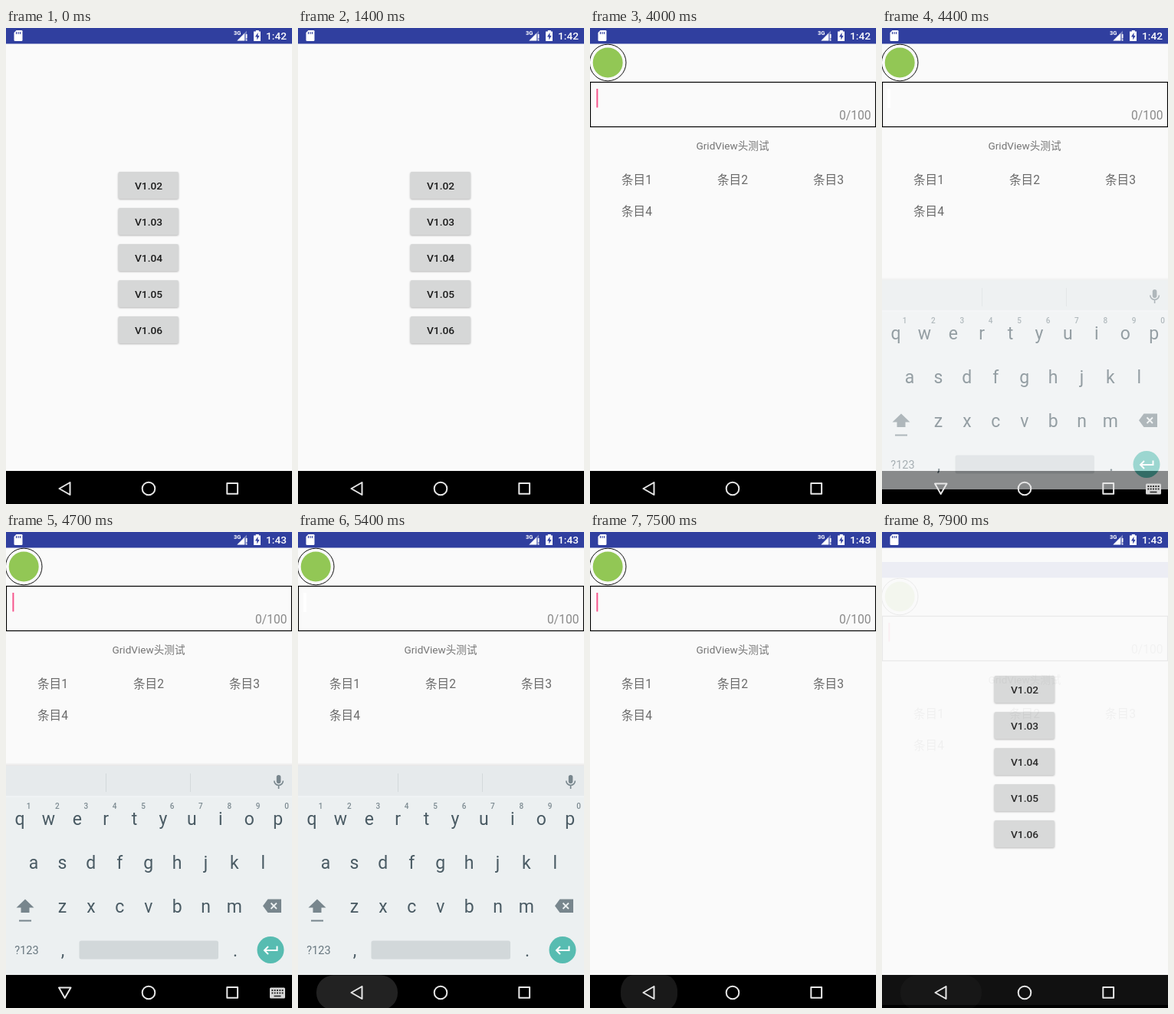
Animation, 373 px wide and 619 px high, one loop 8 s. Source, as an HTML page:

```html
<!DOCTYPE html>
<html lang="zh">
<head>
<meta charset="utf-8">
<title>Demo app</title>
<style>
html, body { margin: 0; width: 100%; height: 100%; overflow: hidden; background: #fafafa; }
svg { display: block; width: 373px; height: 619px; font-family: Roboto, "Noto Sans CJK SC", "Noto Sans CJK", sans-serif; }
.mid { text-anchor: middle; }
.medium { font-weight: 500; font-size: 13.7px; }
.btn rect { fill: #d6d7d7; filter: drop-shadow(0 1px 1px rgba(0,0,0,.28)); }
.anim, .btn.first rect { animation: 8s step-end infinite; }

.btn.first rect { animation-name: press; }
#page { animation-name: page; }
#keys { animation-name: keys; }
#cursor { animation-name: blink; }
#ripple { animation-name: ripple; transform-origin: 77px 599px; }
.early { animation-name: early; }
.late { animation-name: late; }
.ime { animation-name: ime; }
.plain { animation-name: plain; }

@keyframes press {
  10% { fill: #c8c9c9; filter: drop-shadow(0 2px 2px rgba(0,0,0,.34)); }
  15% { fill: #d6d7d7; filter: drop-shadow(0 1.5px 1.5px rgba(0,0,0,.3)); }
  17.5% { fill: #d6d7d7; filter: drop-shadow(0 1px 1px rgba(0,0,0,.28)); }
}
@keyframes page {
  0% { opacity: 0; transform: none; }
  47.5% { opacity: .91; transform: translateY(10px); }
  48.75% { opacity: 1; transform: translateY(1px); }
  50% { opacity: 1; transform: none; }
  97.5% { opacity: .77; transform: translateY(4px); }
  98.75%, 100% { opacity: .07; transform: translateY(39px); }
}
@keyframes keys {
  0% { opacity: 0; transform: none; }
  55% { opacity: .58; transform: translateY(24px); }
  56.25% { opacity: .95; transform: translateY(2px); }
  57.5% { opacity: 1; transform: none; }
  68.75% { opacity: .55; transform: translateY(12px); }
  70%, 100% { opacity: 0; transform: none; }
}
@keyframes blink {
  0%, 57.5%, 70%, 81.25%, 92.5%, 100% { opacity: 1; }
  52.5%, 63.75%, 76.25%, 87.5% { opacity: 0; }
}
@keyframes ripple {
  0% { opacity: 0; transform: none; }
  66.25%, 93.75% { opacity: .1; transform: scaleX(.7); }
  67.5%, 95% { opacity: .135; transform: none; }
  68.75%, 97.5% { opacity: .07; transform: none; }
  70% { opacity: 0; transform: none; }
  98.75%, 100% { opacity: .025; transform: none; }
}
@keyframes early { 0% { opacity: 1; } 58.75%, 100% { opacity: 0; } }
@keyframes late { 0% { opacity: 0; } 58.75%, 100% { opacity: 1; } }
@keyframes ime { 0% { opacity: 0; } 52.5% { opacity: 1; } 66.25%, 100% { opacity: 0; } }
@keyframes plain { 0% { opacity: 1; } 52.5% { opacity: 0; } 66.25%, 100% { opacity: 1; } }
</style>
</head>
<body>
<svg viewBox="0 0 373 619">
  <defs>
    <g id="window">
      <rect width="373" height="619" fill="#fafafa"/>
      <rect width="373" height="20.5" fill="#303f9f"/>
      <rect y="576" width="373" height="43"/>
    </g>
    <linearGradient id="shade" x2="0" y2="1">
      <stop offset="0" stop-opacity="0"/>
      <stop offset="1" stop-opacity=".1"/>
    </linearGradient>
  </defs>

  <use href="#window"/>
  <g id="buttons"></g>

  <g id="page" class="anim">
    <use href="#window"/>
    <circle cx="23.2" cy="45" r="19.5" fill="#92c755"/>
    <circle cx="23.2" cy="45" r="23.8" fill="none" stroke="#111"/>
    <rect x=".5" y="70.5" width="372" height="58" fill="none" stroke="#000" stroke-width="1.2"/>
    <rect x="7" y="79" width="4" height="25" fill="#fff"/>
    <rect id="cursor" class="anim" x="8.4" y="79" width="2" height="24.5" fill="#f4548a"/>
    <text x="366.5" y="119" text-anchor="end" font-size="15.6" fill="#8a8a8a">0/100</text>
    <text class="mid" x="186" y="158" font-size="13.6" fill="#757575">GridView头测试</text>
    <g id="items" class="mid" font-size="15.6" fill="#6a6a6a"></g>
  </g>

  <g id="keys" class="anim">
    <rect y="300" width="373" height="5" fill="url(#shade)"/>
    <rect y="304" width="373" height="272" fill="#ecf0f1"/>
    <rect y="304" width="373" height="39.5" fill="#e6eaec"/>
    <path d="M0 344H373" stroke="#f5f7f8"/>
    <path d="M130.5 314V338M240.500 314V338" stroke="#d3d9db"/>
    <rect y="576" width="373" height="43"/>
    <g fill="#78868d">
      <rect x="352.800" y="316" width="5.600" height="11" rx="2.800"/>
      <path d="M349.800 323.500a5.800 5.800 0 0 0 11.600 0M355.600 329.500V334" fill="none" stroke="#78868d" stroke-width="1.600"/>
      <path d="M25 477.500L36.500 488.500H30.500V495H19.500V488.500H13.500Z"/>
      <rect x="17" y="504.500" width="16" height="2"/>
      <path d="M341.500 477.500H359V495H341.500L335 486.200Z"/>
    </g>
    <path d="M345.500 482.500l7.500 7.500m0-7.500l-7.500 7.500" stroke="#ecf0f1" stroke-width="1.800"/>
    <g id="letters" class="mid" font-size="23" fill="#4a5b64"></g>
    <g id="digits" class="mid" font-size="10" font-weight="500" fill="#7d8b92"></g>
    <text class="mid" x="27" y="549" font-size="14.500" fill="#68777f">?123</text>
    <rect x="95.500" y="531.500" width="181.500" height="24" rx="2.500" fill="#d2d8da"/>
    <circle cx="345" cy="543.500" r="17.500" fill="#57bcb1"/>
    <path d="M353.500 538.500V544H337.500M342 539L337 544L342 549" fill="none" stroke="#fff" stroke-width="2"/>
  </g>

  <g fill="#fff">
    <path d="M13.500 3H20.200Q21.500 3 21.500 4.300V15.700Q21.500 17 20.200 17H11.800Q10.500 17 10.500 15.700V6Z"/>
    <path d="M13.500 5V8M16 5V8M18.500 5V8" stroke="#303f9f" stroke-width="1.100"/>
    <text x="297" y="9" font-size="7.500" font-weight="700">3G</text>
    <path d="M314 3.500V16.500H301Z" opacity=".35"/>
    <path d="M311 7V16.500H301.500Z"/>
    <path d="M312.800 8h1.700v5.500h-1.700zM312.800 14.800h1.700v1.700h-1.700z"/>
    <path d="M325.800 3H329.800V4.500H332V17H323V4.500H325.800Z"/>
    <path d="M328.500 6L325 11.500H327.300V15.500L330.600 10H328.500Z" fill="#303f9f"/>
    <g class="medium">
      <text class="anim early" x="339" y="15">1:42</text>
      <text class="anim late" x="339" y="15">1:43</text>
    </g>
  </g>

  <rect id="ripple" class="anim" x="24" y="576.500" width="106" height="45" rx="22" fill="#fff"/>
  <g fill="none" stroke="#e6e6e6" stroke-width="2" stroke-linejoin="round">
    <path class="anim plain" d="M69.500 599L83.500 591V607Z"/>
    <path class="anim ime" d="M69 592.500H84.500L76.700 606Z"/>
    <circle cx="186" cy="599" r="8.300"/>
    <rect x="288.300" y="592" width="13.800" height="13.800"/>
  </g>
  <g class="anim ime">
    <rect x="344" y="592.500" width="20" height="14" rx="1.500" fill="#d8d8d8"/>
    <path d="M346.500 596H362M346.500 599.500H362" stroke="#222" stroke-width="1.800" stroke-dasharray="1.800 1.500"/>
    <path d="M349.500 603.500H358.500" stroke="#222" stroke-width="1.600"/>
  </g>
</svg>
<script>
const byId = id => document.getElementById(id);
const label = (s, x, y) => `<text x="${x}" y="${y}">${s}</text>`;
const row = (s, x, y) => [...s].map((c, i) => label(c, x + 37.4 * i, y)).join('');

byId('buttons').innerHTML = [2, 3, 4, 5, 6].map((n, i) => {
  const y = 187 + 47 * i;
  return `<g class="btn${i ? '' : ' first'}">
    <rect x="146.500" y="${y}" width="78.500" height="35" rx="2"/>
    <text class="mid medium" x="186" y="${y + 22.5}" fill="#1c1c1c">V1.0${n}</text></g>`;
}).join('');

byId('items').innerHTML = [0, 1, 2, 3].map(i =>
  label('条目' + (i + 1), 61 + 125 * (i % 3), i < 3 ? 203 : 243.5)).join('');

byId('letters').innerHTML = row('qwertyuiop', 18, 381) + row('asdfghjkl', 36, 438)
  + row('zxcvbnm', 73.5, 495) + label(',', 74, 552) + label('.', 299, 552);
byId('digits').innerHTML = row('1234567890', 29.5, 360);
</script>
</body>
</html>
```
